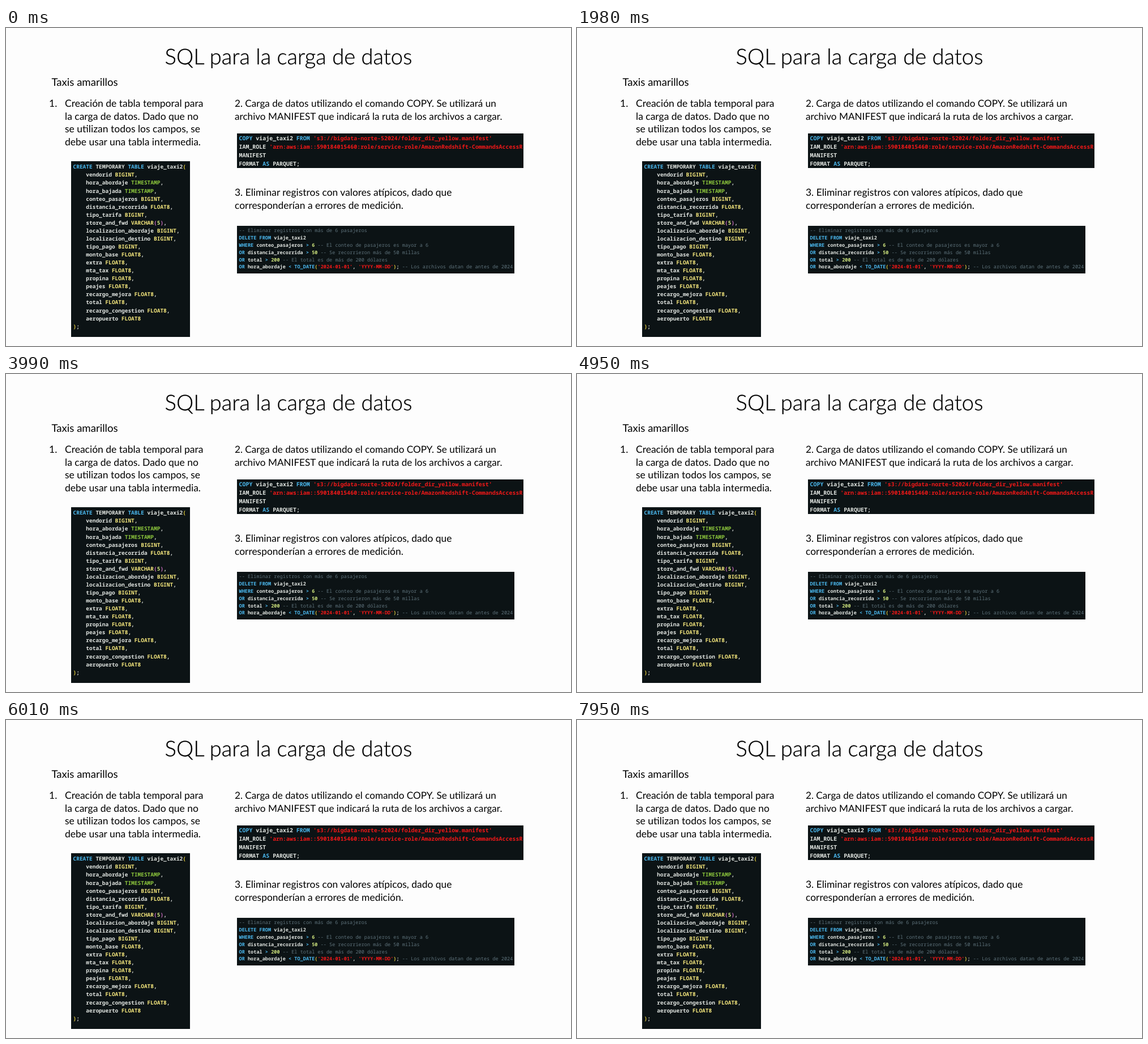
These frames come from a looping animation (998 by 561 pixels, 7.99 s). An HTML page:

```html
<!DOCTYPE html>
<html lang="es">
<head>
<meta charset="utf-8">
<title>SQL para la carga de datos</title>
<style>
  html, body { margin: 0; width: 100%; height: 100%; overflow: hidden; background: #fdfdfd; }
  svg { display: block; width: 998px; height: 561px; }
  text { white-space: pre; text-rendering: geometricPrecision; }
  .prose { font-family: Lato, "Open Sans", sans-serif; fill: #000; }
  .title { font-size: 38.2px; font-weight: 300; text-anchor: middle; stroke: #000; stroke-width: 0.35px; }
  .code { font-family: "Noto Sans Mono", "DejaVu Sans Mono", monospace; fill: #e0e4e0; font-weight: 600; }
  .k { fill: #4bb8ee; }
  .y { fill: #f4e67c; }
  .g { fill: #8cc63c; }
  .n { fill: #cce27c; }
  .p { fill: #cf6fc6; }
  .o { fill: #e6cf3c; }
  .s { fill: #f01818; font-weight: 700; }
  .c { fill: #5f737c; font-weight: 500; }
</style>
</head>
<body>
<svg id="stage" viewBox="0 0 998 561" xmlns="http://www.w3.org/2000/svg"></svg>
<script>
const NS = "http://www.w3.org/2000/svg";
const stage = document.getElementById("stage");

function add(parent, tag, attrs, text) {
  const el = document.createElementNS(NS, tag);
  for (const key in attrs) el.setAttribute(key, attrs[key]);
  if (text !== undefined) el.textContent = text;
  parent.appendChild(el);
  return el;
}

function prose(x, y, size, lines, step = 22.4) {
  lines.forEach((line, i) =>
    add(stage, "text", { class: "prose", x, y: y + i * step, "font-size": size }, line));
}

// Markup: {k:word} colours a word with class k.
function codeLine(parent, x, y, size, line) {
  const el = add(parent, "text", { class: "code", x, y, "font-size": size });
  for (const part of line.split(/(\{\w:[^}]*\})/)) {
    const m = part.match(/^\{(\w):(.*)\}$/);
    if (m) add(el, "tspan", { class: m[1] }, m[2]);
    else if (part) el.appendChild(document.createTextNode(part));
  }
}

function panel({ x, y, w, h, left, base, size, step, lines }) {
  const box = add(stage, "svg", { x, y, width: w, height: h, overflow: "hidden" });
  box.style.width = w + "px";
  box.style.height = h + "px";
  add(box, "rect", { width: w, height: h, fill: "#0c1315" });
  lines.forEach((line, i) => codeLine(box, left - x, base - y + i * step, size, line));
}

add(stage, "rect", { width: 998, height: 561, fill: "#fdfdfd" });
add(stage, "text", { class: "prose title", x: 499, y: 63.5 }, "SQL para la carga de datos");
prose(80.5, 102, 18.6, ["Taxis amarillos"]);
prose(76, 139.3, 17.5, ["1."]);
prose(104, 139.3, 17.5, [
  "Creación de tabla temporal para",
  "la carga de datos. Dado que no",
  "se utilizan todos los campos, se",
  "debe usar una tabla intermedia."
]);
prose(404, 139.3, 17.15, [
  "2. Carga de datos utilizando el comando COPY. Se utilizará un",
  "archivo MANIFEST que indicará la ruta de los archivos a cargar."
]);
prose(404, 296.3, 17.45, [
  "3. Eliminar registros con valores atípicos, dado que",
  "corresponderían a errores de medición."
]);

const fields = [
  "vendorid {y:BIGINT}",
  "hora_abordaje {g:TIMESTAMP}",
  "hora_bajada {g:TIMESTAMP}",
  "conteo_pasajeros {y:BIGINT}",
  "distancia_recorrida {y:FLOAT8}",
  "tipo_tarifa {y:BIGINT}",
  "store_and_fwd {y:VARCHAR}{p:(}{n:5}{p:)}",
  "localizacion_abordaje {y:BIGINT}",
  "localizacion_destino {y:BIGINT}",
  "tipo_pago {y:BIGINT}",
  "monto_base {y:FLOAT8}",
  "extra {y:FLOAT8}",
  "mta_tax {y:FLOAT8}",
  "propina {y:FLOAT8}",
  "peajes {y:FLOAT8}",
  "recargo_mejora {y:FLOAT8}",
  "total {y:FLOAT8}",
  "recargo_congestion {y:FLOAT8}",
  "aeropuerto {y:FLOAT8}"
];

panel({
  x: 115, y: 235, w: 210, h: 310, left: 118.5, base: 248.3, size: 9.51, step: 14.07,
  lines: [
    "{k:CREATE} TEMPORARY {k:TABLE} viaje_taxi2{o:(}",
    ...fields.map((f, i) => "    " + f + (i < fields.length - 1 ? "," : "")),
    "{o:)};"
  ]
});

panel({
  x: 408, y: 186, w: 506, h: 61, left: 411.5, base: 198.4, size: 9.95, step: 14.8,
  lines: [
    "{k:COPY} viaje_taxi2 {k:FROM} {s:'s3://bigdata-norte-52024/folder_dir_yellow.manifest'}",
    "IAM_ROLE {s:'arn:aws:iam::590184015460:role/service-role/AmazonRedshift-CommandsAccessR}",
    "MANIFEST",
    "FORMAT {k:AS} PARQUET;"
  ]
});

panel({
  x: 408, y: 349, w: 490, h: 84, left: 411.5, base: 360.4, size: 8.58, step: 12.8,
  lines: [
    "{c:-- Eliminar registros con más de 6 pasajeros}",
    "{k:DELETE FROM} viaje_taxi2",
    "{k:WHERE} conteo_pasajeros {k:>} {n:6} {c:-- El conteo de pasajeros es mayor a 6}",
    "{k:OR} distancia_recorrida {k:>} {n:50} {c:-- Se recorrieron más de 50 millas}",
    "{k:OR} total {k:>} {n:200} {c:-- El total es de más de 200 dólares}",
    "{k:OR} hora_abordaje {k:<} {k:TO_DATE}{o:(}{s:'2024-01-01'}, {s:'YYYY-MM-DD'}{o:)}; {c:-- Los archivos datan de antes de 2024}"
  ]
});
</script>
</body>
</html>
```
